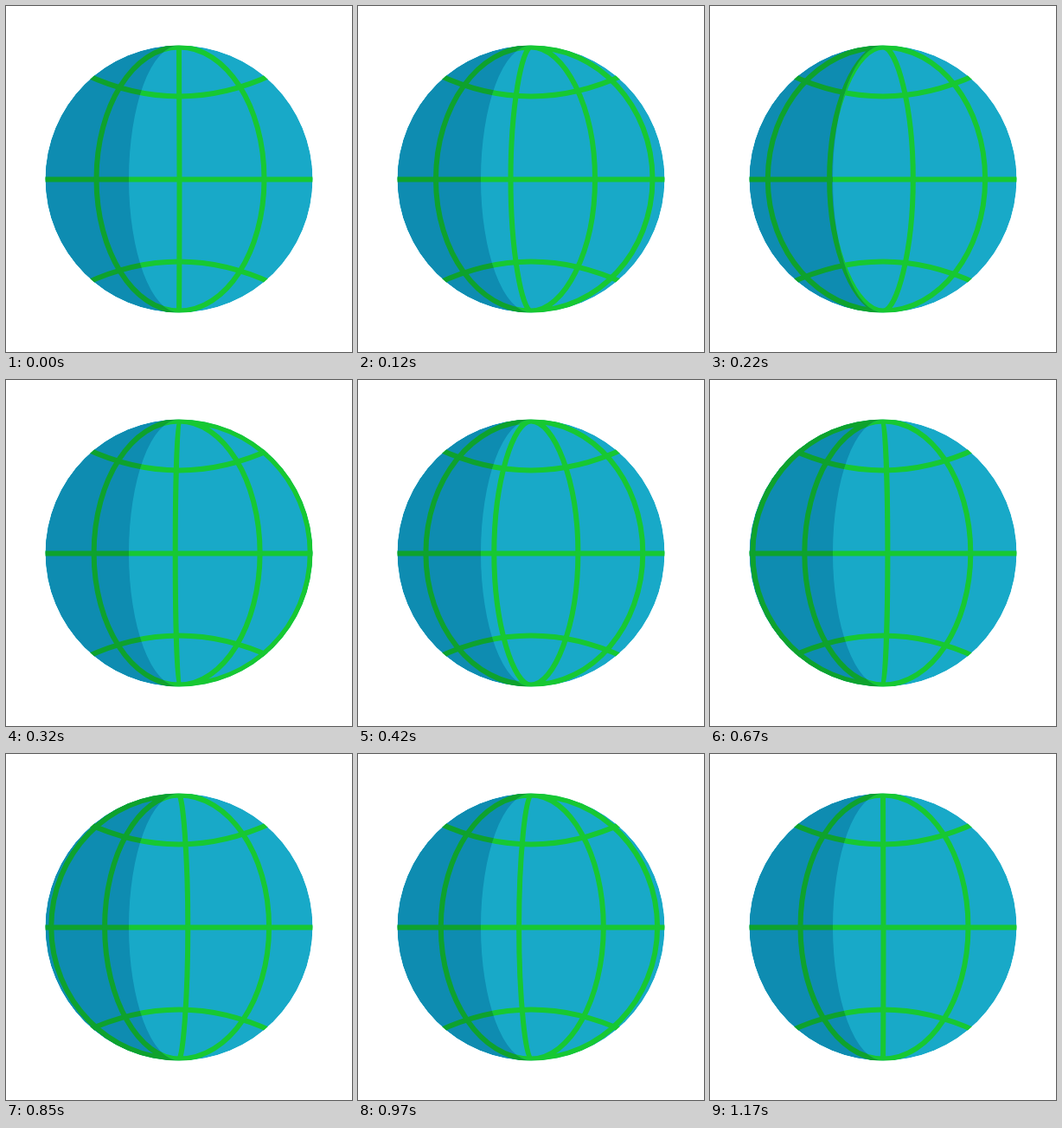
These frames come from a looping animation (400x400 px, 1200 ms). An HTML page:

```html
<!DOCTYPE html>
<html lang="en">
<head>
<meta charset="utf-8">
<title>Spinning globe</title>
<style>
  html, body { margin: 0; width: 100%; height: 100%; overflow: hidden; background: #fff; }
  svg { display: block; width: 100vw; height: 100vh; }
  .lit { --sea: #18a9c8; --grid: #17c832; }
  .dim { --sea: #0e8cb1; --grid: #0ea22d; }
  .sea { fill: var(--sea); }
  .grid { fill: none; stroke: var(--grid); stroke-width: 6; }
</style>
</head>
<body>
<svg viewBox="0 0 400 400">
  <defs>
    <clipPath id="disc"><circle cx="200" cy="200" r="154.5"/></clipPath>
    <clipPath id="shade">
      <path d="M200 45.5A154.5 154.5 0 0 0 200 354.5A58 154.5 0 0 1 200 45.5Z"/>
    </clipPath>
    <g id="globe">
      <circle class="sea" cx="200" cy="200" r="154.5"/>
      <g class="grid">
        <path d="M40 200.5H360M92 79.3Q200 129.7 308 79.3M92 320.7Q200 270.3 308 320.7"/>
        <path id="meridians"/>
      </g>
    </g>
  </defs>
  <g clip-path="url(#disc)">
    <use href="#globe" class="lit"/>
    <g clip-path="url(#shade)"><use href="#globe" class="dim"/></g>
  </g>
</svg>
<script>
  const LOOP = 1200, STEPS = 48, POLE = 200, MID = 200, RY = 152.5, ROUND = 0.5523;
  // Equator crossings a meridian passes through, from rim to rim
  const stops = [46.5, 104.5, 200.5, 298.5, 354.5];
  const path = document.getElementById('meridians');

  function meridian(x) {
    const dx = x - POLE;
    // Curves close to the axis are a little more pointed at the poles
    const k = ROUND - 0.15 * Math.max(0, 1 - Math.abs(dx) / 97);
    const hx = POLE + dx * k, hy = RY * ROUND;
    const top = MID - RY, bottom = MID + RY;
    return `M${POLE} ${top}C${hx} ${top} ${x} ${MID - hy} ${x} ${MID}` +
           `C${x} ${MID + hy} ${hx} ${bottom} ${POLE} ${bottom}`;
  }

  // Steps alternate between 20 and 30 ms
  function stepAt(ms) {
    return 2 * Math.floor(ms / 50) + (ms % 50 >= 20 ? 1 : 0);
  }

  function draw(ms) {
    const step = stepAt(ms % LOOP);
    const u = step === STEPS - 1 ? 0 : (step * 3 % 20) / 20;
    let d = '';
    for (let i = u ? 0 : 1; i < 4; i++) {
      d += meridian(stops[i] + (stops[i + 1] - stops[i]) * u);
    }
    path.setAttribute('d', d);
  }

  let start = null;
  function tick(now) {
    if (start === null) start = now;
    draw(Math.max(0, now - start));
    requestAnimationFrame(tick);
  }
  draw(0);
  requestAnimationFrame(tick);
</script>
</body>
</html>
```
